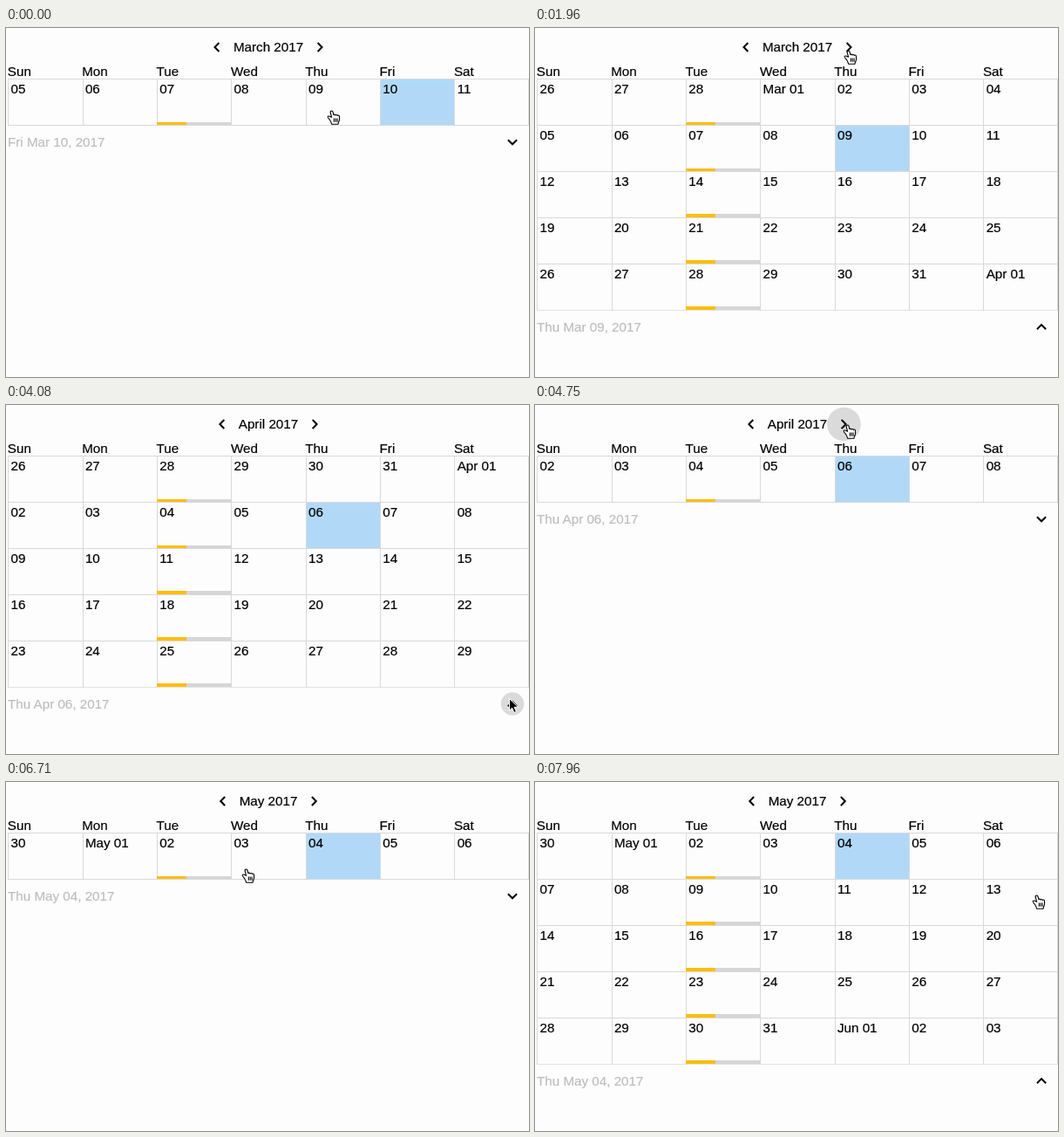
Write an HTML page that moves like this. It is 600 px wide and 400 px high and loops after 8000 ms.

```html
<!DOCTYPE html>
<html lang="en">
<head>
<meta charset="utf-8">
<title>Calendar</title>
<style>
  html, body { margin: 0; width: 100%; height: 100%; overflow: hidden; background: #fdfdfd; }
  svg { display: block; width: 600px; height: 400px; }
  text { font: 15.2px "Liberation Sans", Arial, sans-serif; fill: #000; stroke: #000; stroke-width: .2; }
  .label { fill: #bebebe; stroke: #bebebe; }
  .cell { fill: none; stroke: #d9d9dc; }
  .cell, .bar { shape-rendering: crispEdges; }
  .icon { fill: none; stroke: #000; stroke-width: 2; }
</style>
</head>
<body>
<svg viewBox="0 0 600 400">
  <defs><clipPath id="clip"><rect id="window" x="0" y="58" width="600" height="54"/></clipPath></defs>
  <g id="head"></g>
  <g clip-path="url(#clip)"><g id="weeks"></g></g>
  <circle id="ripple" fill="#dadada"/>
  <text id="title" x="301" y="27.3" text-anchor="middle"></text>
  <path id="prev" class="icon" d="M2.7-5L-2.2 0L2.7 5"/>
  <path id="next" class="icon" d="M-2.7-5L2.2 0L-2.7 5"/>
  <text id="label" class="label" x="2"></text>
  <path id="toggle" class="icon" d="M-5.1-2.7L0 2.4L5.1-2.7"/>
  <g id="hand" stroke="#000" stroke-width="1.1" stroke-linejoin="round">
    <path fill="#fff" d="M.5 0C-.7 0-1 1-.8 2L.6 7.3L-1 6.4C-2.4 5.6-4.2 6-3.8 7.4C-3.3 8.6-1.4 10-.8 11.6C-.2 13 .3 13.6 .5 15.2H8C8 13.4 9.6 11.6 9.6 9.5L9.4 6C9.2 4.8 7.8 4.8 7.4 5.6C7.1 4.4 5.4 4.2 5 5.1C4.6 4 3 3.8 2.9 4.6L1.9 1C1.6 .2 1.2 0 .5 0Z"/>
    <path fill="none" d="M3.3 8.5v4.2M5.2 8.5v4.2M7.1 8.5v4.2"/>
  </g>
  <path id="arrow" fill="#000" stroke="#fff" d="M0 0V13.6L3.1 10.7L5.4 16L7.9 14.9L5.6 9.8H10Z"/>
</svg>
<script>
const LOOP = 8000, TOP = 59, ROW = 52.9, LEFT = 2.15, COL = 85.35, WEEKS = 16;
const PRESS = 130, TRAVEL = 360, REPEAT = 280, FADE = 460;

// Pointer stops: arrival time, tip position, what is clicked there and how often
const stops = [
  { t: 210, x: 373, y: 95, act: "pick" },
  { t: 950, x: 577, y: 132, act: "toggle" },
  { t: 1870, x: 359, y: 26, act: "next" },
  { t: 3040, x: 377, y: 144, act: "pick" },
  { t: 3870, x: 577.5, y: 336.5, act: "toggle" },
  { t: 4490, x: 358, y: 23, act: "next", times: 4 },
  { t: 6210, x: 373, y: 88, act: "pick" },
  { t: 6710, x: 275, y: 100 },
  { t: 7070, x: 575, y: 130, act: "toggle" }
];

const $ = id => document.getElementById(id);
const pad = n => String(n).padStart(2, "0");
const colX = i => Math.min(599, Math.round(LEFT + COL * i));
const dayOf = (week, day) => new Date(2017, 1, 26 + week * 7 + day);
const monthName = (date, style) => date.toLocaleString("en-US", { month: style });
const clamp = p => Math.max(0, Math.min(1, p));
const ease = p => p * p * (3 - 2 * p);
const mix = (a, b, p) => a + (b - a) * p;

function add(parent, tag, attrs, text) {
  const el = document.createElementNS("http://www.w3.org/2000/svg", tag);
  set(el, attrs);
  if (text) el.textContent = text;
  return parent.appendChild(el);
}
function set(el, attrs) { for (const k in attrs) el.setAttribute(k, attrs[k]); }
function move(el, x, y, extra = "") { el.setAttribute("transform", `translate(${x} ${y})${extra}`); }

function weekOfMonth(month) {
  let week = 0;
  while (dayOf(week, 6).getMonth() < month) week++;
  return week;
}

// Play the clicks through once to get the list of states
const states = [{ click: -LOOP, begin: -LOOP, end: -LOOP, top: 1, rows: 1, week: 1, day: 5, month: 2 }];
for (const stop of stops) {
  stop.free = stop.t;
  if (!stop.act) continue;
  for (let i = 0; i < (stop.times || 1); i++) {
    const last = states[states.length - 1];
    const click = stop.t + PRESS + i * REPEAT;
    const s = { ...last, click, act: stop.act, begin: click + PRESS, end: click + PRESS + 310 };
    if (stop.act === "pick") {
      s.day = Math.floor((stop.x - LEFT) / COL);
      s.week = last.top + Math.floor((stop.y - TOP) / ROW);
      s.month = dayOf(s.week, s.day).getMonth();
      s.end = s.begin = click;
    } else if (stop.act === "toggle") {
      s.rows = 6 - last.rows;
      s.top = s.rows > 1 ? weekOfMonth(s.month) : s.week;
    } else {
      if (last.rows > 1) s.month++;
      s.top = last.rows > 1 ? weekOfMonth(s.month) : last.top + 1;
      s.end = s.begin + 100 + 150 * (s.top - last.top);
    }
    states.push(s);
    stop.free = click;
  }
}

"Sun Mon Tue Wed Thu Fri Sat".split(" ")
  .forEach((d, i) => add($("head"), "text", { x: LEFT + COL * i - .3, y: 54.8 }, d));

const mark = add($("weeks"), "rect", { width: 85, height: ROW, fill: "#b1d9f7" });
for (let w = 0; w < WEEKS; w++) {
  const y = w * ROW;
  for (let d = 0; d < 7; d++) {
    const date = dayOf(w, d), n = date.getDate(), x = colX(d);
    const name = n === 1 ? monthName(date, "short") + " " : "";
    add($("weeks"), "rect", { class: "cell", x: x + .5, y: y - .5, width: colX(d + 1) - x, height: ROW });
    add($("weeks"), "text", { x: LEFT + COL * d + 3.4, y: y + 16 }, name + pad(n));
  }
  const bar = { class: "bar", x: colX(2), y: y + 48.6, height: 3.8 };
  add($("weeks"), "rect", { ...bar, width: COL, fill: "#d6d6d6" });
  add($("weeks"), "rect", { ...bar, width: COL * .4, fill: "#ffbd08" });
}

function pointerAt(t) {
  const i = stops.findIndex(s => s.t > t);
  const to = stops[i < 0 ? stops.length - 1 : i];
  const from = i > 0 ? stops[i - 1] : to;
  const start = Math.max(from.free, to.t - TRAVEL);
  const p = ease(clamp((t - start) / (to.t - start)));
  return [mix(from.x, to.x, p), mix(from.y, to.y, p)];
}

function draw(t) {
  const i = states.findLastIndex(s => s.click <= t);
  const now = states[i], last = states[Math.max(0, i - 1)];
  const p = now.end > now.begin ? ease(clamp((t - now.begin) / (now.end - now.begin))) : 1;
  const top = mix(last.top, now.top, p), rows = mix(last.rows, now.rows, p);
  const bottom = TOP + rows * ROW, barY = bottom + 19;

  set($("window"), { height: bottom - 58 });
  move($("weeks"), 0, TOP - top * ROW);
  set(mark, { x: colX(now.day), y: now.week * ROW });

  const picked = dayOf(now.week, now.day).toDateString();
  $("label").textContent = picked.replace(/ (\d{4})$/, ", $1");
  set($("label"), { y: bottom + 24 });
  const open = (t < now.begin ? last : now).rows > 1;
  move($("toggle"), 581, barY, open ? " rotate(180)" : "");

  const month = new Date(2017, (t < now.end ? last : now).month, 1);
  $("title").textContent = monthName(month, "long") + " 2017";
  const gap = $("title").getComputedTextLength() / 2 + 19.2;
  move($("prev"), 301 - gap, 22);
  move($("next"), 301 + gap, 22);

  const age = now.act === "pick" ? FADE : t - now.click;
  const onToggle = now.act === "toggle";
  set($("ripple"), {
    r: 19.3 * clamp(age / 118),
    cx: onToggle ? 581 : 301 + gap,
    cy: onToggle ? barY : 22,
    opacity: clamp((FADE - age) / (FADE * .4))
  });

  const [x, y] = pointerAt(t);
  const link = y < 42 || (y > TOP && y < bottom);
  for (const [id, shown] of [["hand", link], ["arrow", !link]]) {
    move($(id), x, y);
    set($(id), { visibility: shown ? "visible" : "hidden" });
  }
}

const start = performance.now();
function tick() {
  draw((performance.now() - start) % LOOP);
  requestAnimationFrame(tick);
}
tick();
</script>
</body>
</html>
```
